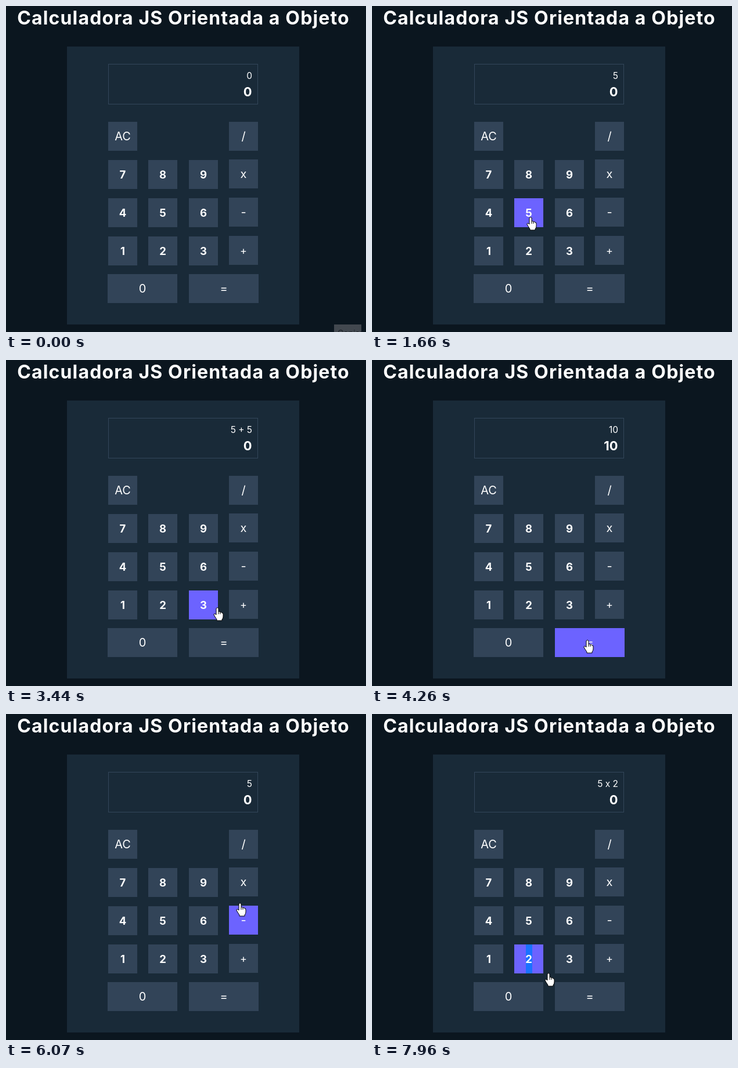
These frames come from a looping animation (620 px wide and 563 px high, 8000 ms). An HTML page:

```html
<!DOCTYPE html>
<html lang="pt">
<head>
<meta charset="utf-8">
<title>Calculadora</title>
<style>
html, body { margin: 0; width: 100%; height: 100%; overflow: hidden; background: #0b161f; }
svg { display: block; width: 620px; height: 563px; }
text { font-family: Inter, "Open Sans", sans-serif; fill: #fff; }
.mid { text-anchor: middle; }
.end { text-anchor: end; }
.bold { font-weight: 700; }
rect { shape-rendering: crispEdges; }
</style>
</head>
<body>
<svg id="stage" viewBox="0 0 620 563"></svg>
<script>
const LOOP = 8000;
const LAG = 70; // the page reacts slightly after the pointer moves
const KEY = '#324458', HOVER = '#6c63ff';
const stage = document.getElementById('stage');

function add(tag, attrs, label) {
  const el = document.createElementNS('http://www.w3.org/2000/svg', tag);
  for (const name in attrs) el.setAttribute(name, attrs[name]);
  if (label) el.textContent = label;
  return stage.appendChild(el);
}
const box = (x, y, width, height, fill) => add('rect', { x, y, width, height, fill });
const write = (x, y, size, cls, label) => add('text', { x, y, 'font-size': size, class: cls }, label);
const show = (el, on) => el.setAttribute('visibility', on ? 'visible' : 'hidden');

box(0, 0, 620, 563, '#0b161f');
box(105, 70, 400, 480, '#192a38');
add('rect', { x: 176.5, y: 100.5, width: 257, height: 69, fill: 'none', stroke: '#33465a' });
write(305.5, 32, 32, 'mid bold', 'Calculadora JS Orientada a Objeto').setAttribute('letter-spacing', 1.15);
const entry = write(424, 126, 15.5, 'end', '0');
const result = write(423.5, 156, 22, 'end bold', '0');

const COLS = [176, 245, 315, 384];
const keys = [
  { x: 176, y: 200, w: 50, label: 'AC' },
  { x: 175, y: 463, w: 120, label: '0' },
  { x: 315, y: 463, w: 120, label: '=' }
];
['/', 'x', '-', '+'].forEach((label, i) =>
  keys.push({ x: COLS[3], y: i ? 199 + 66 * i : 200, w: 50, label }));
for (let n = 1; n <= 9; n++) {
  const row = 2 - Math.floor((n - 1) / 3);
  keys.push({ x: COLS[(n - 1) % 3], y: 266 + 66 * row, w: 50, label: String(n), bold: true });
}
keys.forEach(k => { k.rect = box(k.x, k.y, k.w, 50, KEY); });
const selection = box(265, 398, 11, 50, '#1a72ff');
keys.forEach(k => {
  const size = k.bold ? 18.5 : k.label === '+' ? 18 : 20;
  write(k.x + k.w / 2, k.y + (k.bold ? 31.5 : 32), size, k.bold ? 'mid bold' : 'mid', k.label);
});

const tip = [box(565, 550, 47, 13, '#42484f'), write(571, 570, 14, '', 'Copiar')];
tip[1].style.fill = '#1c2026';

const halo = add('circle', { r: 12, fill: '#e9d626', 'fill-opacity': 0.6 });
const hand = add('path', {
  d: 'M-2 10V1Q0-2 2 1V7Q4 5 5 8Q7 6 8 9Q10 8 10 11V15Q10 18 8 20V22H-1V20Q-4 16-6 12Q-6 9-3 11L-2 12ZM2 7V11M5 8V11',
  fill: '#fff', stroke: '#000', 'stroke-linejoin': 'round'
});
const arrow = add('path', {
  d: 'M0 0V16L4 13L6 19L9 18L6 12H11Z',
  fill: '#fff', stroke: '#000', 'stroke-width': 0.9
});

// arrival time, x, y and, after a rest, departure time
const PATH = [
  [70, 585, 555], [380, 400, 342], [500, 345, 302], [620, 285, 312], [730, 272, 348, 990],
  [1660, 273, 365, 1730], [2250, 416, 422, 2430], [2800, 285, 366], [3060, 272, 358],
  [3300, 305, 408], [3440, 364, 428, 3510], [3580, 379, 431, 3720], [3930, 373, 478],
  [4260, 371, 484, 4520], [5010, 183, 227, 5150], [5600, 266, 354, 5900], [6000, 386, 334],
  [6060, 400, 332], [6070, 403, 327, 6130], [6210, 409, 298, 6530], [6950, 276, 419],
  [7360, 268, 422, 7700], [7930, 293, 441], [7960, 304, 448]
];
// button down, button up, then what the display reads
const CLICKS = [
  [1150, 1330, '5', '0'], [2290, 2430, '5 +', '0'], [2910, 3060, '5 + 5', '0'],
  [3960, 4110, '10', '10'], [5010, 5150, '0', '0'], [5760, 5900, '5', '0'],
  [6270, 6420, '5 x', '0'], [7000, 7150, '5 x 2', '0']
];

function pointer(t) {
  const i = PATH.findIndex(p => p[0] > t);
  if (i < 0) return PATH[PATH.length - 1].slice(1, 3);
  if (i === 0) return PATH[0].slice(1, 3);
  const [arrive, x0, y0, leave = arrive] = PATH[i - 1];
  const [t1, x1, y1] = PATH[i];
  const f = Math.max(0, (t - leave) / (t1 - leave));
  return [x0 + (x1 - x0) * f, y0 + (y1 - y0) * f];
}

function draw(t) {
  const [x, y] = pointer(t), [hx, hy] = pointer(t - LAG);
  const over = keys.find(k => hx >= k.x && hx < k.x + k.w && hy >= k.y && hy < k.y + 50);
  keys.forEach(k => k.rect.setAttribute('fill', k === over ? HOVER : KEY));

  const at = `translate(${Math.round(x)} ${Math.round(y)})`;
  [halo, hand, arrow].forEach(el => el.setAttribute('transform', at));
  show(hand, t >= 70 && over);
  show(arrow, t >= 70 && !over);
  show(halo, CLICKS.some(([down, up]) => t >= down && t < up));
  show(selection, t >= 7150);
  tip.forEach(el => show(el, t < 70));

  const last = CLICKS.filter(c => c[1] <= t).pop();
  entry.textContent = last ? last[2] : '0';
  result.textContent = last ? last[3] : '0';
}

const start = performance.now();
function tick() {
  draw((performance.now() - start) % LOOP);
  requestAnimationFrame(tick);
}
draw(0);
requestAnimationFrame(tick);
</script>
</body>
</html>
```
